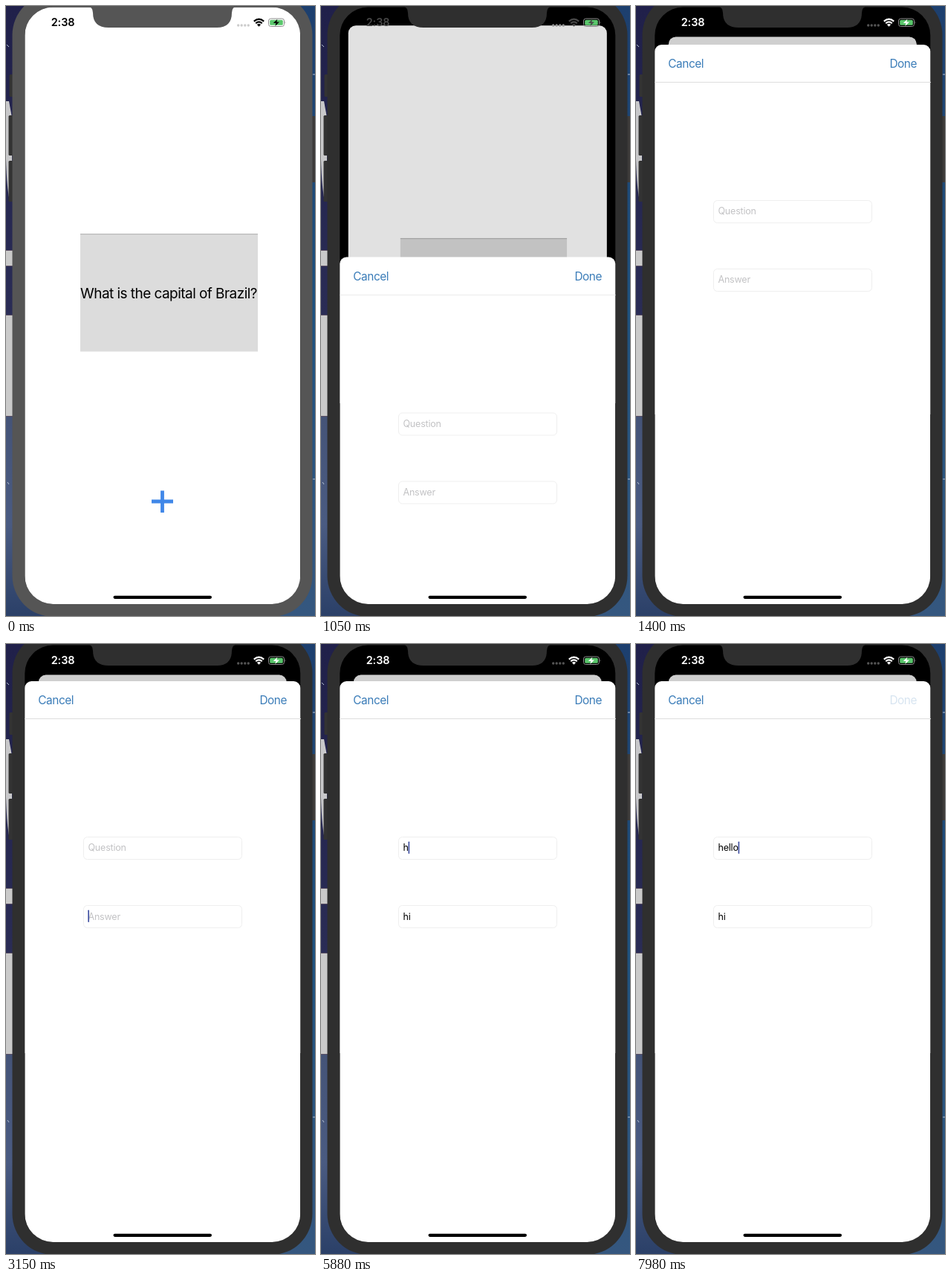
These frames come from a looping animation (416x820 px, 8 s). An HTML page:

```html
<!DOCTYPE html>
<html lang="en">
<head>
<meta charset="utf-8">
<title>Flashcard sheet</title>
<style>
html, body { margin: 0; width: 100%; height: 100%; overflow: hidden; }
svg { display: block; width: 416px; height: 820px; font-family: Inter, "Open Sans", sans-serif; }
svg * { animation-duration: 8s; animation-iteration-count: infinite; animation-timing-function: linear; }

.bezel { fill: #2f2f2f; animation-name: bezel; }
.status { color: #fff; animation-name: status; }
.dots { fill: #555; animation-name: dots; }
.plus { animation-name: plus; }
.done { animation-name: done; }
.rule { animation-name: rule; }
#caret { opacity: 0; animation-name: caret; }

.card { font-size: 19px; letter-spacing: -.55px; }
.nav { font-size: 15.4px; letter-spacing: -.45px; fill: #3a7cb8; }
.field { fill: #fff; stroke: #efefef; }
.entry { font-size: 12.5px; letter-spacing: -.2px; }
.hint { fill: #c2c2c4; }

@keyframes bezel { 0%, .87% { fill: #555; } 3.5%, 100% { fill: #2f2f2f; } }
@keyframes status { 0%, 12.25% { color: #000; } 15.4%, 100% { color: #fff; } }
@keyframes dots { 0%, 12.25% { fill: #ccc; } 14%, 100% { fill: #555; } }
@keyframes plus { 0%, 7% { opacity: 1; } 8.5%, 12.5% { opacity: .2; } 16%, 100% { opacity: 1; } }
@keyframes done { 0%, 95.8% { opacity: 1; } 97.5%, 100% { opacity: .2; } }
@keyframes rule { 0%, 12.6% { opacity: 0; } 13.5%, 100% { opacity: 1; } }
@keyframes caret {
  0%, 33.25% { opacity: 0; }
  35.9%, 50.75% { opacity: 1; }
  53.4% { opacity: 0; }
  56%, 87.5% { opacity: 1; }
  90.1%, 95.4% { opacity: 0; }
  97.1%, 100% { opacity: 1; }
}
</style>
</head>
<body>
<svg viewBox="0 0 416 820">
  <defs>
    <clipPath id="screen"><rect x="25.3" y="1.5" width="371" height="802.5" rx="38"/></clipPath>
    <linearGradient id="leftSky" x2="0" y2="1">
      <stop offset="0" stop-color="#20204a"/>
      <stop offset=".5" stop-color="#2a2c55"/>
      <stop offset=".68" stop-color="#455478"/>
      <stop offset=".85" stop-color="#4a5b82"/>
      <stop offset="1" stop-color="#2b4068"/>
    </linearGradient>
    <linearGradient id="rightSky" x2="0" y2="1">
      <stop offset="0" stop-color="#1d3f6e"/>
      <stop offset=".5" stop-color="#1f527f"/>
      <stop offset="1" stop-color="#35577f"/>
    </linearGradient>
  </defs>

  <!-- wallpaper -->
  <rect width="208" height="820" fill="url(#leftSky)"/>
  <rect x="208" width="208" height="820" fill="url(#rightSky)"/>
  <path d="M0 128H4L8 150V262H5Q1 245 0 205Z" fill="#c8c8ca"/>
  <path d="M0 329H9V349H0ZM0 416H9V551H0Z" fill="#cacaca"/>
  <path d="M0 328.5H9M0 349.5H9M0 415.5H9M0 551.5H9" stroke="#5c5064"/>
  <path d="M1 52l3 3M2 640l2 3M413 92h3M413 636h3" stroke="#b4bfd2"/>

  <!-- device -->
  <g fill="#333">
    <rect x="4.5" y="92" width="6" height="30" rx="1.5"/>
    <rect x="3.5" y="147" width="6" height="54" rx="1.5"/>
    <rect x="3.5" y="208" width="6" height="55" rx="1.5"/>
    <rect x="410" y="148" width="8" height="89" rx="1.5" fill="#3d3b3a"/>
  </g>
  <rect class="bezel" x="8.5" y="-16" width="404" height="837" rx="55"/>

  <g clip-path="url(#screen)">
    <rect width="416" height="820"/>
    <g id="back">
      <rect id="page" x="25.3" y="1.5" width="371" height="802.5" fill="#fff"/>
      <rect x="100" y="306" width="239" height="158.5" fill="#dcdcdc"/>
      <path d="M100 306.7H339" stroke="#b9b9b9" stroke-width="1.2"/>
      <text class="card" x="219" y="393" text-anchor="middle">What is the capital of Brazil?</text>
      <path class="plus" d="M196 666H225M210.5 651.5V681" stroke="#4087e8" stroke-width="4.8"/>
      <rect id="dim" x="25.3" y="1.5" width="371" height="802.5" opacity="0"/>
    </g>
    <g id="sheet">
      <rect x="25.3" width="371" height="830" rx="9" fill="#fff"/>
      <text class="nav" x="43.3" y="31">Cancel</text>
      <text class="nav done" x="378" y="31" text-anchor="end">Done</text>
      <path class="rule" d="M25 50.5H397" stroke="#dedede"/>
      <rect class="field" x="104.5" y="209.5" width="213" height="30" rx="5"/>
      <rect class="field" x="104.5" y="301.5" width="213" height="30" rx="5"/>
      <text class="entry" id="question" x="110.5" y="228"></text>
      <text class="entry" id="answer" x="110.5" y="320.5"></text>
      <rect id="caret" width="1.7" height="16.5" rx=".8" fill="#4454a4"/>
    </g>
  </g>

  <path class="bezel" d="M109 0Q117 1 117 9Q117 29 138 29H284Q304 29 304 9Q304 1 312 0Z"/>

  <!-- status bar -->
  <g class="status" fill="currentColor">
    <text x="60.7" y="27.3" font-size="14.5" font-weight="600" letter-spacing="-.1">2:38</text>
    <g class="dots">
      <circle cx="312.7" cy="26" r="1.7"/><circle cx="317.2" cy="26" r="1.7"/>
      <circle cx="321.8" cy="26" r="1.7"/><circle cx="326.3" cy="26" r="1.7"/>
    </g>
    <g fill="none" stroke="currentColor" stroke-width="2.1">
      <path d="M333.8 20.6Q340.5 14.6 347.2 20.6M336.2 23.3Q340.5 19.4 344.8 23.3"/>
    </g>
    <path d="M340.5 27.8L337.9 25.1Q340.5 23 343.1 25.1Z"/>
    <rect x="353.5" y="17" width="21" height="10.5" rx="3" fill="none" stroke="#8d8d8d"/>
    <path d="M375.7 20.5Q377.3 22.2 375.7 24Z" fill="#8d8d8d"/>
    <rect x="355.2" y="18.7" width="17.6" height="7.1" rx="1.6" fill="#5ac76c"/>
    <path d="M365.3 17.8L359.8 23H363.4L362.4 26.9L368 21.6H364.4Z"/>
  </g>
  <rect x="144.5" y="792.7" width="132.5" height="4.2" rx="2.1"/>
</svg>
<script>
const LOOP = 8000;
const OPEN = 929;      // sheet starts to rise
const OMEGA = 0.0173;  // critically damped spring, per ms
const TOP = 50, TRAVEL = 754;
const MOVE_FOCUS = 5110;

const $ = id => document.getElementById(id);
const back = $('back'), page = $('page'), dim = $('dim'), sheet = $('sheet'), caret = $('caret');

const fields = {
  question: { el: $('question'), hint: 'Question', text: 'hello', keys: [5810, 6020, 6230, 6370, 6580], caretY: 215.5 },
  answer: { el: $('answer'), hint: 'Answer', text: 'hi', keys: [3430, 3710], caretY: 307.5 }
};

function spring(t) {
  if (t <= 0) return 0;
  const x = OMEGA * t;
  return 1 - (1 + x) * Math.exp(-x);
}

function type(field, t) {
  const count = field.keys.filter(k => t >= k).length;
  const shown = count ? field.text.slice(0, count) : field.hint;
  if (field.el.textContent !== shown) field.el.textContent = shown;
  field.el.classList.toggle('hint', !count);
  return count;
}

function draw(t) {
  const p = spring(t - OPEN);
  const scale = 1 - 0.1 * p;
  back.setAttribute('transform', `translate(210.8 402) scale(${scale}) translate(-210.8 -402)`);
  const radius = p ? 11 : 0;
  page.setAttribute('rx', radius);
  dim.setAttribute('rx', radius);
  dim.setAttribute('opacity', 0.19 * p);
  sheet.setAttribute('transform', `translate(0 ${TOP + TRAVEL * (1 - p)})`);

  const counts = { question: type(fields.question, t), answer: type(fields.answer, t) };
  const focus = t < MOVE_FOCUS ? 'answer' : 'question';
  const { el, caretY } = fields[focus];
  const width = counts[focus] ? el.getComputedTextLength() : 0;
  caret.setAttribute('x', 110.3 + width);
  caret.setAttribute('y', caretY);
}

let start;
function tick(now) {
  start ??= now;
  draw((now - start) % LOOP);
  requestAnimationFrame(tick);
}
draw(0);
requestAnimationFrame(tick);
</script>
</body>
</html>
```
